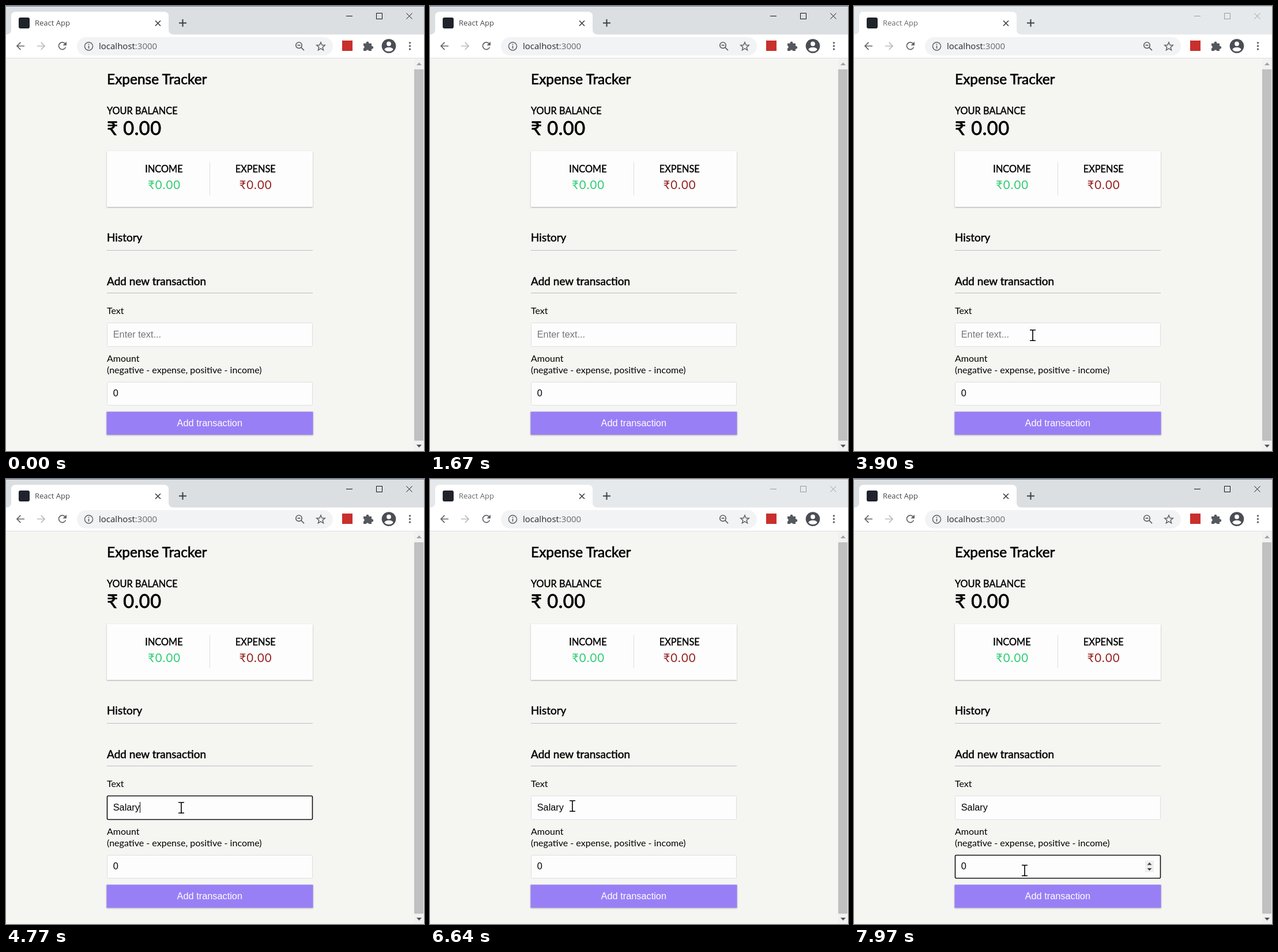
An HTML page that plays this animation: 725 px wide and 773 px high, repeating every 8000 ms.

```html
<!DOCTYPE html>
<html lang="en">
<head>
<meta charset="utf-8">
<title>Expense Tracker</title>
<style>
  html, body { margin: 0; width: 100%; height: 100%; overflow: hidden; background: #f5f5f2; }
  svg { display: block; width: 100%; height: 100%; }
  text { white-space: pre; }
  .page { font: 16.05px Lato, sans-serif; }
  .bold { font-size: 16.32px; stroke: #000; stroke-width: .026em; }
  .h1 { font-size: 32.64px; letter-spacing: .5px; }
  .h2 { font-size: 24.48px; }
  .h3 { font-size: 19px; }
  .money { font-size: 20.4px; letter-spacing: 1.02px; }
  .mid { text-anchor: middle; }
  .form { font: 16.32px "Liberation Sans", Arial, sans-serif; }
  .ui { font-family: "Open Sans", sans-serif; }
  .card { filter: drop-shadow(0 1px 1px rgba(0,0,0,.32)); }
  .field { fill: #fdfdfd; stroke: #dedee2; }
  .field.focus { stroke: #101010; stroke-width: 1.6; }
  .line { fill: none; stroke: #5f6368; stroke-width: 1.7; }
</style>
</head>
<body>
<svg viewBox="0 0 725 773">
  <!-- Browser window -->
  <rect id="strip" width="725" height="50"/>
  <rect id="edge" width="725" height="1"/>
  <path fill="#fff" d="M0 49.5Q9 49.5 9 41V18Q9 10 17 10H274Q282 10 282 18V41Q282 49.5 291 49.5H725V90H0Z"/>
  <rect y="90" width="725" height="1" fill="#dfe0e2"/>
  <rect x="22" y="20" width="19" height="19" rx="3" fill="#20232a"/>
  <text id="tabTitle" class="ui" x="50" y="34.3" font-size="13">React App</text>
  <path class="line" style="stroke:#3c4043" d="M259 25.5l9 9m0-9l-9 9"/>
  <path class="line" style="stroke:#3c4043;stroke-width:2" d="M300 29.5h13m-6.5-6.5v13"/>
  <path id="controls" fill="none" d="M590 17.5h11M642.5 12.5h10v10h-10zM694.5 12.5l10 10m0-10l-10 10"/>

  <path class="line" d="M32 69.5H19m6.3-6.3l-6.3 6.3 6.3 6.3"/>
  <path class="line" style="stroke:#b9bbbe" d="M54 69.5h13m-6.3-6.3l6.3 6.3-6.3 6.3"/>
  <path class="line" d="M102.6 65.5A6.2 6.2 0 1 0 103.5 71.5"/>
  <path fill="#5f6368" d="M105 62v6.6h-6.6z"/>
  <rect x="123" y="54" width="444" height="32" rx="16" fill="#f1f3f4"/>
  <circle class="line" cx="143.5" cy="70" r="7" style="stroke-width:1.5"/>
  <path class="line" d="M143.5 69v5M143.5 65.8v1.8"/>
  <text class="ui" x="161" y="75.3" font-size="15" fill="#25272b">localhost<tspan fill="#666a6f">:3000</tspan></text>
  <circle class="line" cx="508" cy="68.2" r="5.2"/>
  <path class="line" d="M512 72.2l5 5M505.5 68.2h5"/>
  <path class="line" style="stroke-width:1.5" d="M546 63l2 4.8 5.2.4-4 3.4 1.3 5.1-4.5-2.8-4.5 2.8 1.3-5.1-4-3.4 5.2-.4z"/>
  <rect x="583" y="60" width="18" height="18" fill="#c9302c"/>
  <path fill="#55595e" d="M620 65h4.6a2.5 2.5 0 1 1 4.8 0H634v4.6a2.5 2.5 0 1 1 0 4.8V78h-4.6a2.5 2.5 0 0 0-4.8 0H620v-4.4a2.4 2.4 0 0 0 0-4.6z"/>
  <circle cx="664" cy="69.5" r="12.3" fill="#4a4e54"/>
  <circle cx="664" cy="65.7" r="3.9" fill="#fff"/>
  <path fill="#fff" d="M656.3 75.5Q658 71.8 664 71.8T671.7 75.5Q669 79 664 79T656.3 75.5"/>
  <g fill="#5f6368"><circle cx="700.5" cy="64" r="1.7"/><circle cx="700.5" cy="69.5" r="1.7"/><circle cx="700.5" cy="75" r="1.7"/></g>

  <!-- Page -->
  <rect y="91" width="708" height="682" fill="#f5f5f2"/>
  <rect x="708" y="91" width="17" height="682" fill="#f1f1f1"/>
  <rect x="708" y="110" width="16" height="645" fill="#c0c0c0"/>
  <path fill="#a3a3a3" d="M712 103l4.5-5 4.5 5z"/>
  <path fill="#505050" d="M712 762l4.5 5 4.5-5z"/>

  <g class="page">
    <text class="bold h2" x="175" y="136">Expense Tracker</text>
    <text class="bold" x="175" y="188">YOUR BALANCE</text>
    <text class="bold h1" x="175" y="224">₹ 0.00</text>
    <rect class="card" x="175" y="252" width="357" height="97" fill="#fdfdfd"/>
    <rect x="353" y="271" width="1" height="58" fill="#dedee2"/>
    <text class="bold mid" x="274" y="289">INCOME</text>
    <text class="bold mid" x="432.7" y="289">EXPENSE</text>
    <text class="money mid" x="274.5" y="318" fill="#2ecc71">₹0.00</text>
    <text class="money mid" x="433" y="318" fill="#962020">₹0.00</text>
    <text class="bold h3" x="175" y="409">History</text>
    <text class="bold h3" x="175" y="484.5">Add new transaction</text>
    <path stroke="#bcbcca" d="M175 424.5h357M175 498.5h357"/>
    <text x="175" y="535">Text</text>
    <text x="175" y="618">Amount</text>
    <text x="175" y="637.7">(negative - expense, positive - income)</text>
  </g>

  <g class="form">
    <rect id="textField" class="field" x="175.5" y="550.5" width="356" height="41" rx="2"/>
    <rect id="amountField" class="field" x="175.5" y="653.5" width="356" height="40" rx="2"/>
    <text id="entry" x="185.7" y="576.3"></text>
    <text x="185.7" y="678.3">0</text>
    <rect id="caret" width="1" height="19"/>
    <g id="spinner">
      <rect x="505" y="663" width="15" height="20" fill="#efefef"/>
      <path fill="#444" d="M508.5 670.5l4-4.5 4 4.5zM508.5 676l4 4.5 4-4.5z"/>
    </g>
    <rect class="card" x="174.5" y="704.7" width="358" height="40" fill="#997ff6"/>
    <text class="mid" x="353.3" y="729.5" fill="#fff">Add transaction</text>
  </g>

  <g id="pointer">
    <path id="beam" fill="none" stroke="#000" stroke-width="1.6" d="M-5-9.2h3.5Q0-9.2 0-8Q0-9.2 1.5-9.2H5M0-8.5V8.5M-5 9.2h3.5Q0 9.2 0 8Q0 9.2 1.5 9.2H5"/>
    <path id="arrow" fill="#fff" stroke="#000" d="M0 0v16l3.7-3.5 2.5 5.8 2.6-1.1-2.5-5.7h5.2z"/>
  </g>
</svg>
<script>
const LOOP = 8000;
const WORD = "Salary";
const TYPE_START = 4200, KEY_GAP = 90;
const TEXT_CLICK = 3990, AMOUNT_CLICK = 7120;
const AWAY = [[2670, TEXT_CLICK], [5400, AMOUNT_CLICK]];
const BLINK = 530;

// Pointer stops: time, x, y
const PATH = [
  [3420, 720, 690], [3800, 310, 572], [3920, 310, 572], [4060, 304, 571],
  [5350, 304, 571], [6000, 247, 568], [6660, 247, 568], [7060, 296, 680]
];

const $ = id => document.getElementById(id);
const show = (id, on) => $(id).setAttribute("visibility", on ? "visible" : "hidden");
const within = (t, [from, to]) => t >= from && t < to;
const ease = p => p * p * (3 - 2 * p);

function pointerAt(t) {
  const next = PATH.findIndex(stop => stop[0] > t);
  if (next < 0) return PATH.at(-1).slice(1);
  if (next === 0) return null;
  const [t0, x0, y0] = PATH[next - 1], [t1, x1, y1] = PATH[next];
  const p = ease((t - t0) / (t1 - t0));
  return [x0 + (x1 - x0) * p, y0 + (y1 - y0) * p];
}

function drawWindow(active) {
  $("strip").setAttribute("fill", active ? "#dbdfe2" : "#e6e9eb");
  $("edge").setAttribute("fill", active ? "#6f7f9c" : "#b9bdc2");
  $("tabTitle").setAttribute("fill", active ? "#45494d" : "#66696d");
  $("controls").setAttribute("stroke", active ? "#111" : "#999");
}

function drawForm(t, active) {
  const typed = Math.max(0, Math.min(WORD.length, Math.floor((t - TYPE_START) / KEY_GAP) + 1));
  const onAmount = t >= AMOUNT_CLICK;
  const onText = active && t >= TEXT_CLICK && !onAmount;
  const entry = $("entry");
  entry.textContent = typed ? WORD.slice(0, typed) : "Enter text...";
  entry.setAttribute("fill", typed ? "#000" : "#757575");
  $("textField").classList.toggle("focus", onText);
  $("amountField").classList.toggle("focus", onAmount);

  const lastKey = typed ? TYPE_START + (typed - 1) * KEY_GAP : TEXT_CLICK;
  const since = t - (onAmount ? AMOUNT_CLICK : lastKey);
  const width = onAmount ? 9.1 : typed ? entry.getComputedTextLength() : 0;
  $("caret").setAttribute("x", Math.round(185.7 + width));
  $("caret").setAttribute("y", onAmount ? 663 : 561);
  show("caret", (onText || onAmount) && Math.floor(since / BLINK) % 2 === 0);
}

function drawPointer(t) {
  const at = pointerAt(t);
  const [x, y] = at || [0, 0];
  const overForm = x > 175 && x < 532 && y > 520 && y < 694;
  $("pointer").setAttribute("transform", `translate(${Math.round(x)} ${Math.round(y)})`);
  show("beam", at && overForm);
  show("arrow", at && !overForm);
  show("spinner", t >= AMOUNT_CLICK || (overForm && y > 653));
}

function frame() {
  const t = performance.now() % LOOP;
  const active = !AWAY.some(span => within(t, span));
  drawWindow(active);
  drawForm(t, active);
  drawPointer(t);
  requestAnimationFrame(frame);
}
frame();
</script>
</body>
</html>
```
